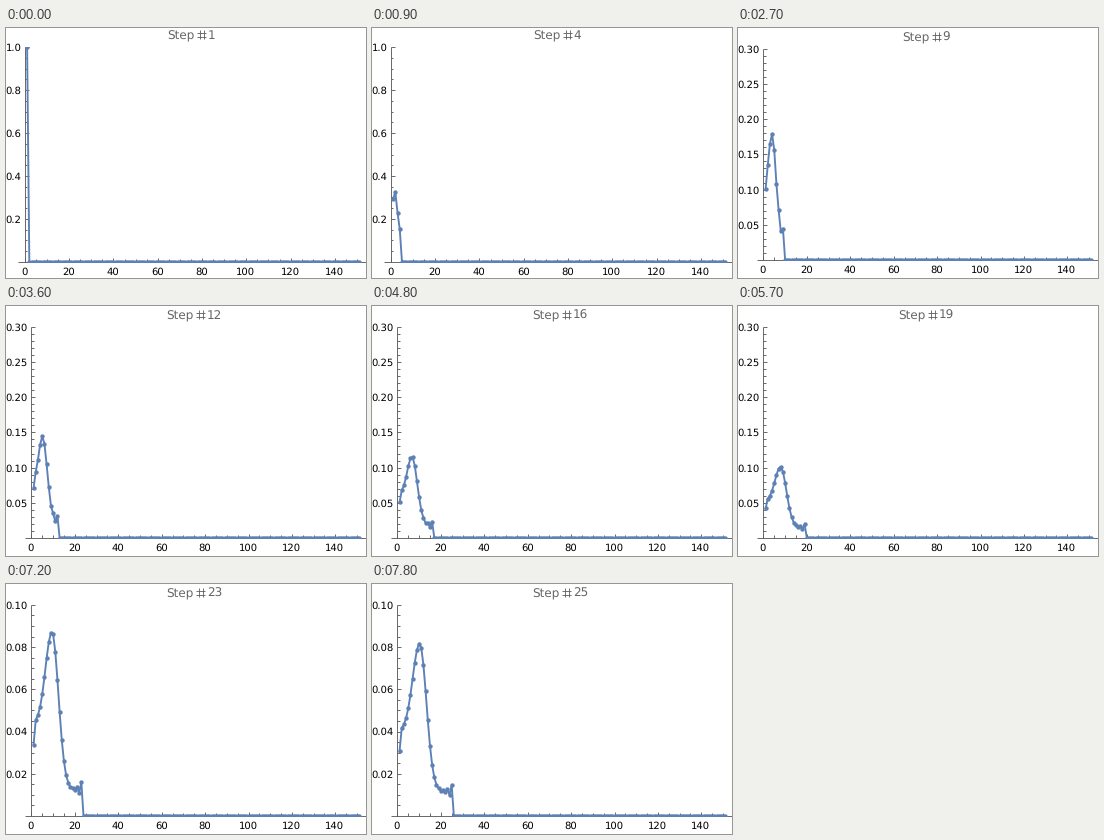
Animation of 360 by 250 pixels, one loop 8 s. Source, as a matplotlib script:

```python
import numpy as np
import matplotlib.pyplot as plt
from matplotlib.animation import FuncAnimation
from matplotlib.patches import Rectangle

W, H, DPI = 360, 250, 100
PX = 72 / DPI  # points per pixel
BLUE, AXIS, TITLE = "#5e81b5", "#5c5c5c", "#666666"
CELLS = 151
plt.rcParams["text.hinting"] = "none"

# (step, vertical scale): a step is shown twice where the scale switches
SCHEDULE = ([(s, 1.0) for s in range(1, 6)]
            + [(s, 0.3) for s in range(5, 21)]
            + [(s, 0.1) for s in range(20, 26)])

# per scale: major tick, minor tick, label decimals
TICKS = {1.0: (0.2, 0.05, 1), 0.3: (0.05, 0.01, 2), 0.1: (0.02, 0.005, 2)}


def distribution(n):
    """A moving hump between a high left plateau and a low, rippling tail."""
    k = np.arange(1, n + 1)
    centre = 0.398 * n + 0.3
    height = 0.62 + 0.44 * np.log(n)
    left = k < centre
    spread = np.where(left, 0.122 * n + 0.15, 0.62 * np.sqrt(n))
    level = np.where(left, 1.0, 0.29)
    p = level + (height - level) * np.exp(-((k - centre) / spread) ** 2 / 2)
    p += 0.075 * (-0.55) ** (n - k)
    p[0] = 0.70 + 1.7 / n
    return p / p.sum()


fig = plt.figure(figsize=(W / DPI, H / DPI), dpi=DPI, facecolor="white")
ax = fig.add_axes([0, 0, 1, 1])


def stroke(x, y, color=AXIS, width=0.9):
    ax.plot(x, y, color=color, lw=width * PX, solid_capstyle="butt", zorder=1)


def label(x, y, text, size=10, color="black", ha="left"):
    ax.text(x, y, text, fontsize=size * PX, color=color, ha=ha,
            va="baseline", family="DejaVu Sans")


def draw_title(step, cx, base):
    left = cx - 6 * (3.433 + 0.636 * len(str(step)))
    label(left, base, "Step", 12, TITLE)
    label(left + 40.6, base, str(step), 12, TITLE)
    h = left + 30.2
    for dx in (2.5, 6.5):
        stroke([h + dx] * 2, [base - 9, base], TITLE)
    for dy in (6.5, 2.5):
        stroke([h, h + 9], [base - dy] * 2, TITLE)


def draw(frame):
    ax.clear()
    ax.set(xlim=(0, W), ylim=(H, 0))
    ax.axis("off")
    step, scale = SCHEDULE[frame // 3]
    wide = scale == 1.0
    x0, dx = (18.9, 2.214) if wide else (25.4, 2.171)
    y0, top = (233.9, 19.2) if wide else (231.9, 20.9)
    dy = (y0 - top) / scale

    stroke([x0 - 3 * dx, x0 + 154 * dx], [y0, y0])
    stroke([x0, x0], [top, y0])
    for v in range(0, CELLS, 5):
        x, major = x0 + dx * v, v % 20 == 0
        stroke([x, x], [y0, y0 - (4 if major else 2.5)])
        if major:
            label(x - 0.4, y0 + 13, str(v), ha="center")

    major_tick, minor_tick, decimals = TICKS[scale]
    per_major = round(major_tick / minor_tick)
    for i in range(1, round(scale / minor_tick) + 1):
        v = i * minor_tick
        y, major = y0 - dy * v, i % per_major == 0
        stroke([x0, x0 + (4 if major else 2.5)], [y, y])
        if major:
            label(x0 - 3.3, y + 3.8, f"{v:.{decimals}f}", ha="right")

    values = np.zeros(CELLS)
    values[:step] = distribution(step)
    xs = x0 + dx * np.arange(1, CELLS + 1)
    curve, = ax.plot(xs, y0 - dy * values, color=BLUE, lw=1.9 * PX,
                     marker="o", ms=4.4 * PX, mew=0, snap=False, zorder=2)
    curve.set_clip_path(Rectangle((0, top), W, y0 + 0.5 - top,
                                  transform=ax.transData))

    draw_title(step, 185.5 if wide else 188.5, 11 if wide else 13)
    return []


anim = FuncAnimation(fig, draw, frames=80, interval=100, repeat=True,
                     repeat_delay=0, init_func=lambda: [])
plt.show()
```
